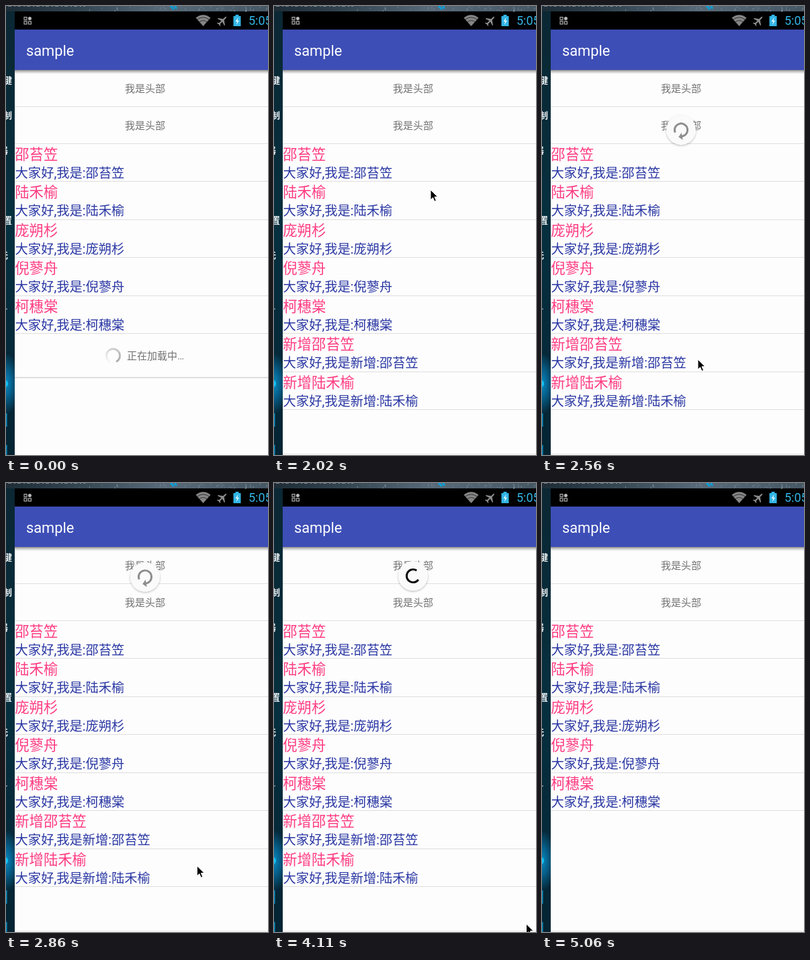
Animation of 390 by 667 pixels, one loop 6.2 s. Source, as an HTML page:

```html
<!DOCTYPE html>
<html lang="zh-CN">
<head>
<meta charset="utf-8">
<title>sample</title>
<style>
html, body { margin: 0; width: 100%; height: 100%; overflow: hidden; background: #fdfdfd; }
#stage { position: relative; width: 390px; height: 667px; overflow: hidden; }
svg { position: absolute; left: 0; top: 0; }
text { font-family: Roboto, "Noto Sans CJK SC", "Noto Sans CJK", sans-serif; }
.gray { font-size: 15px; fill: #737373; }
.name { font-size: 21.3px; fill: #ff3c82; }
.line { font-size: 19.3px; fill: #2a37a3; }
.side { font-size: 13px; font-weight: 700; fill: #f4f8fa; text-anchor: end; }
.loading { animation: loading 6.2s step-end infinite; }
.extra { animation: extra 6.2s step-end infinite; }
.loaded { animation: loaded 6.2s step-end infinite; }
#ring {
  position: absolute; left: 148px; top: 508px; width: 23px; height: 23px; border-radius: 50%;
  background: conic-gradient(#8880 10%, #888c);
  -webkit-mask: radial-gradient(circle, #0000 8.3px, #000 9px);
  mask: radial-gradient(circle, #0000 8.3px, #000 9px);
  animation: turn 6.2s linear infinite, loading 6.2s step-end infinite;
}
@keyframes turn { from { transform: rotate(155deg); } to { transform: rotate(843deg); } }
/* loading ends at 1500 ms, the refreshed list arrives at 4910 ms */
@keyframes loading { 0% { visibility: visible; } 24.194%, 100% { visibility: hidden; } }
@keyframes loaded { 0% { visibility: hidden; } 24.194%, 100% { visibility: visible; } }
@keyframes extra { 0% { visibility: hidden; } 24.194% { visibility: visible; } 79.194%, 100% { visibility: hidden; } }
</style>
</head>
<body>
<div id="stage">
  <svg width="390" height="667">
    <rect width="390" height="667" fill="#fdfdfd"/>
    <g text-anchor="middle" class="gray">
      <text x="207" y="128.2">我是头部</text>
      <text x="207" y="183.2">我是头部</text>
    </g>
    <path d="M13 149.5H390M13 204.5H390" stroke="#e0e0e0"/>
    <g id="rows"></g>
    <g class="loading">
      <text class="gray" x="180" y="525.4">正在加载中…</text>
      <path d="M13 552H390" stroke="#dedede" stroke-width="2"/>
    </g>
    <path class="loaded" d="M13 665.5H390" stroke="#e4e4e4"/>
  </svg>
  <div id="ring"></div>
  <svg width="390" height="667">
    <defs>
      <linearGradient id="shade" x2="0" y2="1">
        <stop stop-color="#000" stop-opacity=".45"/><stop offset=".45" stop-color="#000" stop-opacity=".2"/>
        <stop offset="1" stop-color="#000" stop-opacity="0"/>
      </linearGradient>
      <linearGradient id="wall" x2="0" y2="1">
        <stop stop-color="#0b2733"/><stop offset=".5" stop-color="#06303f"/>
        <stop offset=".75" stop-color="#052a3a"/><stop offset="1" stop-color="#042433"/>
      </linearGradient>
      <linearGradient id="sky">
        <stop stop-color="#1d2c36"/><stop offset=".3" stop-color="#364854"/>
        <stop offset=".6" stop-color="#586a79"/><stop offset="1" stop-color="#465764"/>
      </linearGradient>
      <radialGradient id="glow">
        <stop stop-color="#088abf"/><stop offset=".45" stop-color="#065f8b"/>
        <stop offset="1" stop-color="#065f8b" stop-opacity="0"/>
      </radialGradient>
      <filter id="soft" x="-30%" y="-30%" width="160%" height="160%">
        <feDropShadow dx="0" dy="1.2" stdDeviation="1.6" flood-opacity=".28"/>
      </filter>
    </defs>

    <g id="circle">
      <circle r="22" fill="#fafafa" filter="url(#soft)"/>
      <g id="mark">
        <path id="arc" fill="none" stroke="#000" stroke-width="2.9"/>
        <path id="head" d="M-5.5 0H5.5L0 5.5Z"/>
      </g>
    </g>

    <rect x="13" y="95" width="377" height="6" fill="url(#shade)"/>
    <rect x="13" y="35" width="377" height="60" fill="#3d4eb6"/>
    <text x="30" y="74" font-size="21.8" fill="#fff">sample</text>
    <rect x="13" y="8" width="377" height="27"/>

    <g fill="none" stroke="#a9a9a9" stroke-width="1.2">
      <path d="M27 16.6h4v4h-4zM27 22.9h4v4h-4zM33.4 22.9h4v4h-4z"/>
      <circle cx="35.4" cy="18.6" r="2" fill="#c4c4c4"/>
    </g>
    <path d="M293.5 30L282.5 17.5Q293.5 9 304.5 17.5Z" fill="#858585"/>
    <path d="M284.5 20.2Q293.5 13.5 302.5 20.2M287.5 23.8Q293.5 19.3 299.5 23.8" fill="none" stroke="#333" stroke-width="1"/>
    <path transform="translate(322 22) rotate(45) scale(.9)" fill="#8c8c8c"
      d="M0 -9.5Q1.2 -9 1.2 -6V-3L8 1.8V3.2L1.2 1.2V6L3.6 8V9L0 8.2L-3.6 9V8L-1.2 6V1.2L-8 3.2V1.8L-1.2 -3V-6Q-1.2 -9 0 -9.5Z"/>
    <path d="M341.5 13h5v2h3v15h-11v-15h3z" fill="#33b5e5"/>
    <path d="M345.5 17l-4 6h2.5l-1 5 4-6.3h-2.6z" fill="#e6f8ff"/>
    <text x="361" y="28" font-size="18" fill="#33b5e5">5:05</text>

    <rect width="13" height="667" fill="url(#wall)"/>
    <rect width="390" height="8" fill="url(#sky)"/>
    <g id="rain" stroke="#a9bac6"></g>
    <path d="M3 0H118" stroke="#c8d0d4" stroke-dasharray="5 4 2 3"/>
    <path d="M245 0l5 5M251 0l3 4" stroke="#0a9ed6" stroke-width="3"/>
    <svg width="13" height="667">
      <ellipse cy="561" rx="20" ry="46" fill="url(#glow)"/>
      <circle cx="-3" cy="561" r="6" fill="#12c4fb"/>
      <path d="M0 605V625M0 652V667" stroke="#0a8fc4" stroke-width="3"/>
      <g class="side">
        <text x="9" y="115">键</text><text x="9" y="167">制</text><text x="3" y="219">器</text>
        <text x="9" y="323">置</text><text x="3" y="375">无</text><text x="3" y="451" opacity=".5">.</text>
      </g>
    </svg>

    <path id="cursor" d="M0 0V15L3.5 11.7L6 17.3L8.5 16.2L6 10.7H10.8Z" stroke="#fff" stroke-width="1"/>
  </svg>
</div>
<script>
const LOOP = 6200, DRAG = 64, TOP = 74, RADIUS = 9.6;
const RELEASE = 2745, SPIN = 2945, CYCLE = 3560, CYCLE_MS = 1333, HIDE = 4910, GONE = 5060;
const $ = id => document.getElementById(id);
const clamp = v => Math.min(1, Math.max(0, v));
const ease = v => (1 - Math.cos(Math.PI * clamp(v))) / 2;

const people = ['邵苔笠', '陆禾榆', '庞朔杉', '倪蓼舟', '柯穗棠'];
const row = (name, i, added = '') => {
  const y = 204.5 + 56.45 * i;
  return `<g class="${added && 'extra'}">
    <text class="name" x="13.3" y="${y + 23.5}">${added}${name}</text>
    <text class="line" x="13.6" y="${y + 50.5}">大家好,我是${added}:${name}</text>
    <path d="M13 ${Math.floor(y + 56.45) + .5}H390" stroke="#dedede"/></g>`;
};
$('rows').innerHTML = people.map((name, i) => row(name, i)).join('') +
  people.slice(0, 2).map((name, i) => row(name, i + 5, '新增')).join('');

let seed = 7;
const random = () => (seed = seed * 16807 % 2147483647) / 2147483647;
$('rain').innerHTML = Array.from({ length: 60 }, () => {
  const x = 110 + random() * 280, y = random() * 6;
  return `<path d="M${x} ${y}l-.5 ${1 + random() * 3}" opacity="${random() * .6}"/>`;
}).join('');

// time, x, y of the pointer
const path = [
  [1620, 384, 667], [1800, 318, 439], [1930, 247, 309], [2020, 233, 273], [2080, 233, 274],
  [2300, 232.5, 393], [2540, 232, 525], [2720, 232, 525], [2950, 318, 597], [3180, 383.5, 651],
  [3700, 380.5, 652], [4110, 375.5, 655], [4300, 377.5, 655], [4450, 384, 667]
];

function pointer(t) {
  const i = path.findIndex(p => p[0] > t);
  if (i < 1) return null;
  const [a, b] = [path[i - 1], path[i]], k = (t - a[0]) / (b[0] - a[0]);
  return { x: a[1] + (b[1] - a[1]) * k, y: a[2] + (b[2] - a[2]) * k };
}

// Pull distance with elastic resistance beyond the trigger point
function pull(t) {
  const p = pointer(Math.min(t, 2720 - 1));
  const over = Math.max(0, (p.y - 276) / 2);
  const part = clamp(over / DRAG);
  const q = Math.min(2, Math.max(0, over - DRAG) / DRAG) / 4;
  const tension = (q - q * q) * 2;
  const shown = Math.max(part - .4, 0) * 5 / 3;
  return {
    offset: DRAG * (part + tension * 2),
    rotation: (-.25 + .4 * shown + tension * 2) / 2,
    length: .8 * shown,
    alpha: .3 + .13 * clamp((t - 2340) / 220)
  };
}

function drawMark(start, end, alpha, arrow) {
  const a = start * 2 * Math.PI, b = end * 2 * Math.PI;
  const at = v => `${RADIUS * Math.cos(v)} ${RADIUS * Math.sin(v)}`;
  $('arc').setAttribute('d', `M${at(a)}A${RADIUS} ${RADIUS} 0 ${end - start > .5 ? 1 : 0} 1 ${at(b)}`);
  $('head').setAttribute('transform', `rotate(${end * 360 - 5}) translate(${RADIUS} 0) scale(${arrow})`);
  $('mark').setAttribute('opacity', alpha);
}

function drawCircle(t) {
  const visible = t > 2080 && t < GONE;
  $('circle').style.display = visible ? '' : 'none';
  if (!visible) return;
  const drag = pull(t);
  const back = 1 - (1 - clamp((t - RELEASE) / 200)) ** 4;
  const y = TOP + drag.offset + (DRAG - drag.offset) * back;
  $('circle').setAttribute('transform', `translate(207 ${y}) scale(${1 - clamp((t - HIDE) / (GONE - HIDE))})`);
  if (t < SPIN) {
    drawMark(drag.rotation, drag.rotation + drag.length, drag.alpha, drag.length / .8);
  } else if (t < CYCLE) {
    const k = (t - SPIN) / (CYCLE - SPIN);
    const turn = drag.rotation + (1 - drag.rotation) * k;
    drawMark(turn + .8 * k, turn + .8 + .01 * k, 1, 0);
  } else {
    const cycles = (t - CYCLE) / CYCLE_MS, n = Math.floor(cycles), k = cycles - n;
    const base = .83 + .8 * n + .65 * cycles;
    drawMark(base + .755 * ease(2 * k - 1), base + .045 + .755 * ease(2 * k), 1, 0);
  }
}

let begin;
function frame(now) {
  begin ??= now;
  const t = (now - begin) % LOOP, p = pointer(t);
  $('cursor').style.display = p ? '' : 'none';
  if (p) $('cursor').setAttribute('transform', `translate(${p.x} ${p.y})`);
  drawCircle(t);
  requestAnimationFrame(frame);
}
requestAnimationFrame(frame);
</script>
</body>
</html>
```
